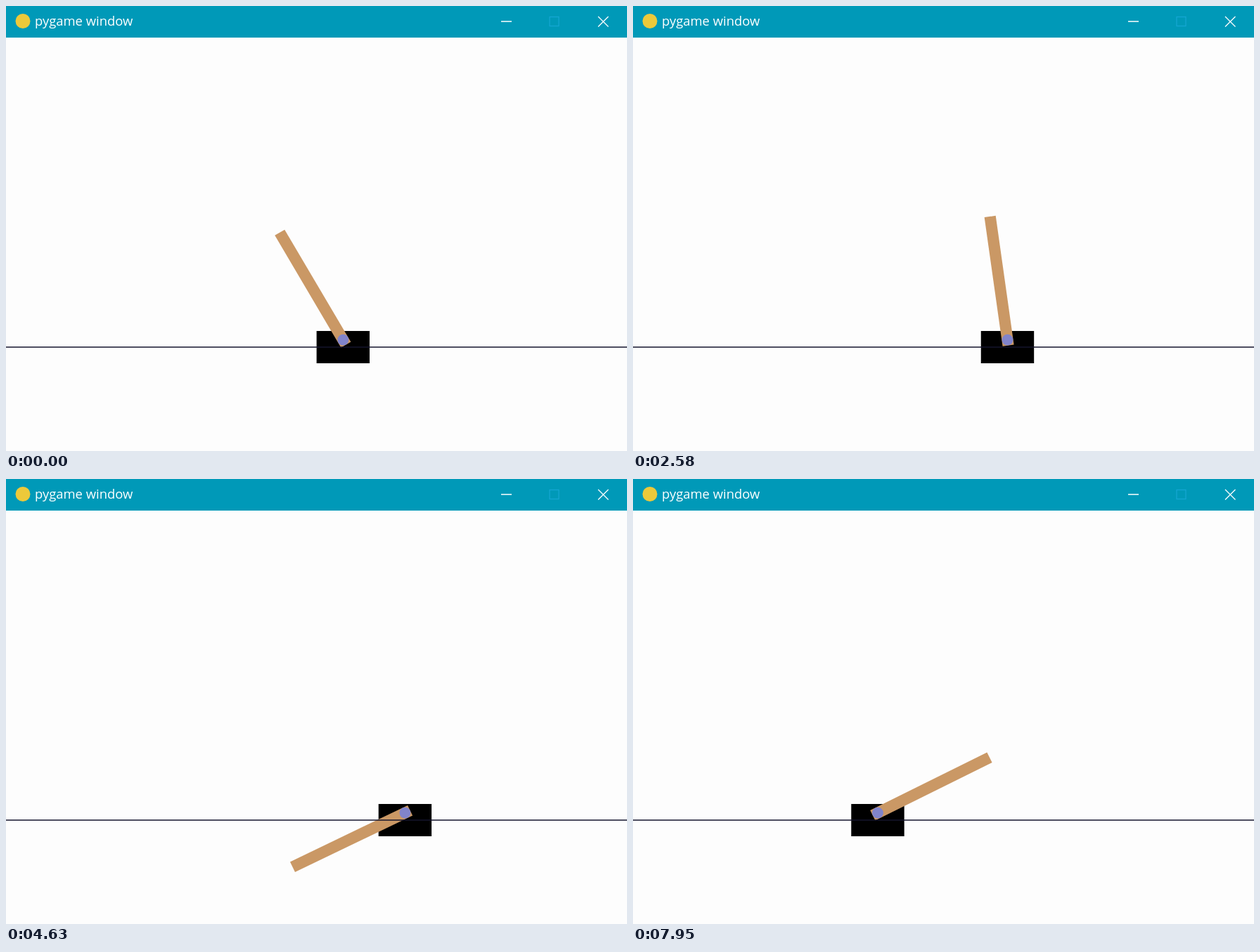
Recreate the animation shown at these times as an HTML page. Size 883x634 px, loop 7.99 s.

```html
<!DOCTYPE html>
<html lang="en">
<head>
<meta charset="utf-8">
<title>pygame window</title>
<style>
  html, body { margin: 0; width: 100%; height: 100%; overflow: hidden; background: #fdfdfd; }
  svg { display: block; width: 100vw; height: 100vh; }
  text { font: 18.4px "Open Sans", "Noto Sans", sans-serif; fill: #fff; }
</style>
</head>
<body>
<svg viewBox="0 0 883 634">
  <rect width="883" height="634" fill="#fdfdfd"/>

  <g id="cart">
    <rect x="-37.7" y="463" width="75.4" height="46"/>
    <g transform="translate(0 475.7)">
      <rect id="pole" x="-8.1" y="-177.5" width="16.2" height="185.5" fill="#ca9865"/>
      <circle r="7.9" fill="#8184cb"/>
    </g>
  </g>
  <path d="M0 486H883" stroke="#15152c" stroke-width="1.7"/>

  <rect width="883" height="45" fill="#0099b8"/>
  <circle cx="24" cy="21.5" r="10.5" fill="#ecc93a"/>
  <text x="41" y="28">pygame window</text>
  <g fill="none" stroke="#fff" stroke-width="1.3">
    <path d="M704 22H719M842 15L856.500 29.500M856.500 15L842 29.500"/>
    <rect x="773" y="15.500" width="13" height="13" stroke="#14a6d2"/>
  </g>
</svg>
<script>
  const LOOP = 7990, STEP = 40.955;
  const SWING = 0.5; // how much the pole lingers at the top
  const cart = document.getElementById('cart');
  const pole = document.getElementById('pole');

  // Turning at an even phase gives a pole that is slow on top and fast below.
  const toPhase = angle => angle + SWING * Math.sin(angle);
  function toAngle(phase) {
    let angle = phase;
    for (let i = 0; i < 24; i++) angle = phase - SWING * Math.sin(angle);
    return angle;
  }

  // Time in seconds, cart centre, full turns and degrees clockwise from upright
  const poses = [
    [0, 479.3, 0, -30.5],
    [1.8, 427.5, 1, 93.7],
    [2.46, 510, 2, -14],
    [3.32, 671.8, 2, -27.4],
    [4.63, 567.4, 3, -115.7],
    [5.82, 365.6, 3, 166.1],
    [6.76, 174.4, 4, 46.1],
    [7.38, 168, 5, -92],
    [7.95, 348, 5, 63.6]
  ].map(([t, x, turns, deg]) => ({ t, x, phase: toPhase((turns + deg / 360) * 2 * Math.PI) }));

  function slope(key, i) {
    const a = poses[Math.max(i - 1, 0)];
    const b = poses[Math.min(i + 1, poses.length - 1)];
    return (b[key] - a[key]) / (b.t - a.t);
  }

  // Cubic Hermite curve through the poses
  function sample(key, t) {
    let i = 0;
    while (i < poses.length - 2 && t >= poses[i + 1].t) i++;
    const a = poses[i], b = poses[i + 1];
    const span = b.t - a.t, u = Math.min((t - a.t) / span, 1), w = 1 - u;
    return a[key] * (1 + 2 * u) * w * w + b[key] * u * u * (3 - 2 * u)
      + span * u * w * (slope(key, i) * w - slope(key, i + 1) * u);
  }

  function draw(ms) {
    // The window repaints about every 41 ms, on a 10 ms clock.
    const step = Math.floor((ms + 5) / STEP);
    const t = Math.round(step * STEP / 10) / 100;
    const angle = toAngle(sample('phase', t)) * 180 / Math.PI;
    cart.setAttribute('transform', `translate(${sample('x', t).toFixed(2)} 0)`);
    pole.setAttribute('transform', `rotate(${angle.toFixed(2)})`);
  }

  const start = performance.now();
  function tick() {
    draw((performance.now() - start) % LOOP);
    requestAnimationFrame(tick);
  }
  tick();
</script>
</body>
</html>
```
